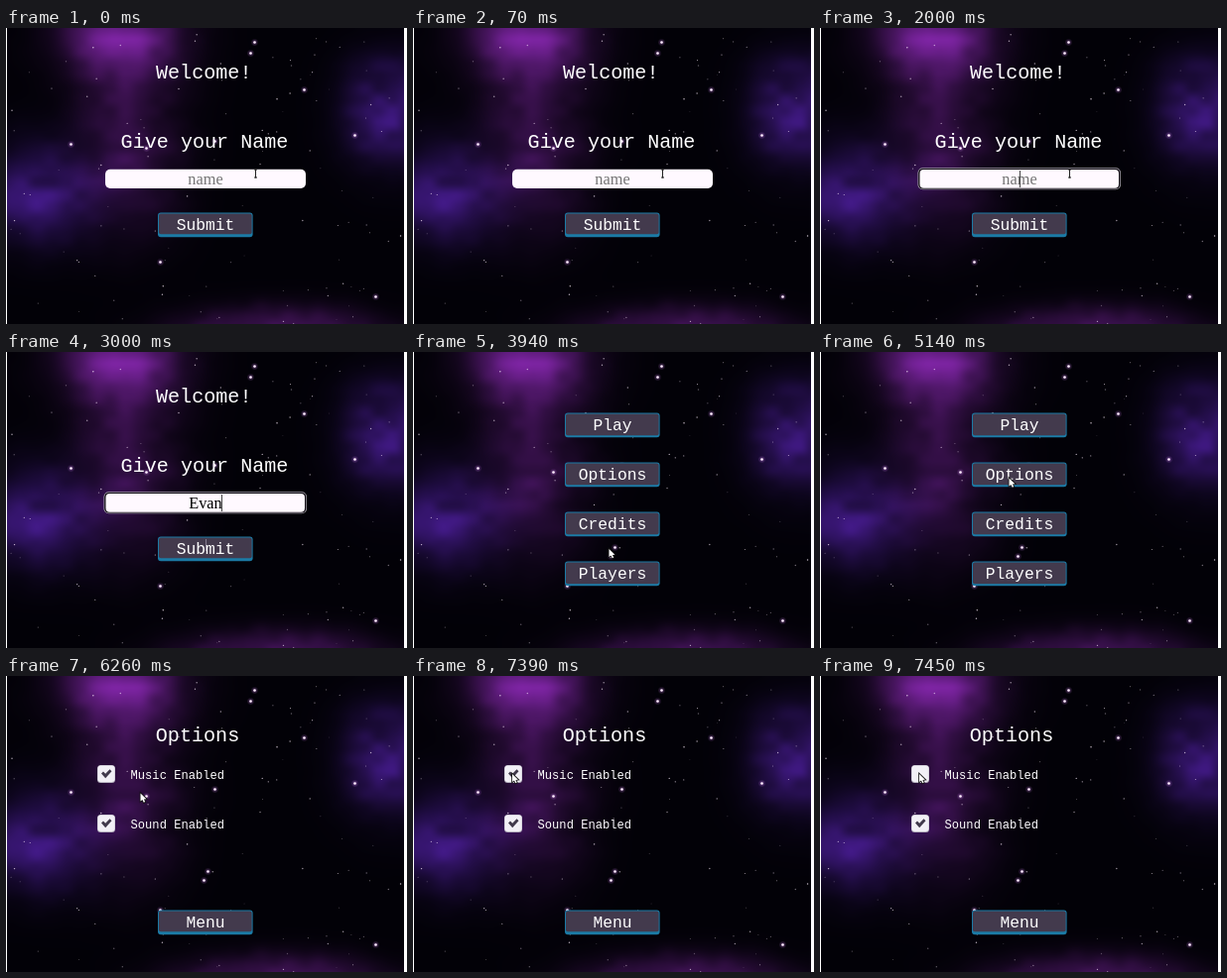
Recreate the animation shown at these times as an HTML page with a canvas. Size 404 px wide and 299 px high, loop 8 s.

```html
<!DOCTYPE html>
<html lang="en">
<head>
<meta charset="utf-8">
<title>Game menu</title>
<style>
html, body { margin: 0; width: 100%; height: 100%; overflow: hidden; background: #fff; }
canvas { display: block; width: 404px; height: 299px; }
</style>
</head>
<body>
<canvas id="stage"></canvas>
<script>
const W = 404, H = 299, LOOP = 8000, MID = 201;
const MONO = '"Liberation Mono", monospace';
const SERIF = '"Liberation Serif", serif';
const VIOLET = [98, 28, 124], INDIGO = [62, 24, 124];
const dpr = window.devicePixelRatio || 1;

function prepare(canvas) {
  canvas.width = Math.round(W * dpr);
  canvas.height = Math.round(H * dpr);
  const c = canvas.getContext('2d');
  c.scale(dpr, dpr);
  return c;
}

const ctx = prepare(document.getElementById('stage'));
const sky = document.createElement('canvas');

function seeded(seed) {
  return () => (seed = (seed * 16807) % 2147483647) / 2147483647;
}

function hash(x, y) {
  const s = Math.sin(x * 127.1 + y * 311.7) * 43758.5453;
  return s - Math.floor(s);
}

// Smooth value noise, 0 to 1.
function noise(x, y) {
  const ix = Math.floor(x), iy = Math.floor(y);
  const ease = v => v * v * (3 - 2 * v);
  const mix = (a, b, k) => a + (b - a) * k;
  const u = ease(x - ix), v = ease(y - iy);
  return mix(mix(hash(ix, iy), hash(ix + 1, iy), u),
    mix(hash(ix, iy + 1), hash(ix + 1, iy + 1), u), v);
}

// Gaussian clouds, broken up by noise.
function paintNebula(c) {
  const clouds = [
    { x: 115, y: 8, rx: 50, ry: 38, power: 0.95, rgb: VIOLET },
    { x: 125, y: 120, rx: 42, ry: 65, power: 0.55, rgb: VIOLET },
    { x: 30, y: 165, rx: 55, ry: 42, power: 0.8, rgb: INDIGO },
    { x: 385, y: 85, rx: 36, ry: 45, power: 0.9, rgb: INDIGO },
    { x: 275, y: 306, rx: 72, ry: 20, power: 1, rgb: VIOLET }
  ];
  const layer = document.createElement('canvas');
  layer.width = W;
  layer.height = H;
  const lc = layer.getContext('2d');
  const image = lc.createImageData(W, H);
  for (let y = 0; y < H; y++) {
    for (let x = 0; x < W; x++) {
      const i = (y * W + x) * 4;
      const n = noise(x / 38, y / 30) * 0.65 + noise(x / 15, y / 12) * 0.35;
      const rgb = [2, 1, 7];
      for (const cl of clouds) {
        const dx = (x - cl.x) / cl.rx, dy = (y - cl.y) / cl.ry;
        const k = cl.power * Math.exp(-(dx * dx + dy * dy) * 0.8) * (0.5 + n);
        cl.rgb.forEach((v, j) => { rgb[j] += v * k; });
      }
      image.data.set([...rgb, 255], i);
    }
  }
  lc.putImageData(image, 0, 0);
  c.drawImage(layer, 0, 0, W, H);
}

function star(c, x, y, r, alpha, glow) {
  if (glow) {
    const g = c.createRadialGradient(x, y, 0, x, y, r * 3);
    g.addColorStop(0, 'rgba(190,120,220,0.5)');
    g.addColorStop(1, 'rgba(190,120,220,0)');
    c.fillStyle = g;
    c.fillRect(x - 5, y - 5, 10, 10);
  }
  c.fillStyle = `rgba(255,240,255,${alpha})`;
  c.beginPath();
  c.arc(x, y, r, 0, Math.PI * 2);
  c.fill();
}

function paintSky() {
  const c = prepare(sky), rnd = seeded(4217);
  c.fillStyle = '#fff';
  c.fillRect(0, 0, W, H);
  c.beginPath();
  c.rect(1, 0, 400, H);
  c.clip();
  paintNebula(c);
  for (let i = 0; i < 110; i++) {
    star(c, 1 + rnd() * 400, rnd() * H, 0.4 + rnd() * 0.4, 0.25 + rnd() * 0.55);
  }
  const bright = [
    [250, 14], [246, 25], [300, 62], [351, 108], [65, 117], [141, 121],
    [210, 114], [203, 197], [199, 206], [155, 236], [372, 271]
  ];
  bright.forEach(([x, y]) => star(c, x + 0.5, y + 0.5, 1.3, 1, true));
}

function box(x, y, w, h, r, fill) {
  ctx.fillStyle = fill;
  ctx.beginPath();
  ctx.roundRect(x, y, w, h, r);
  ctx.fill();
}

function text(str, x, y, size, align = 'left', color = '#fff', family = MONO) {
  ctx.font = `${size}px ${family}`;
  ctx.textAlign = align;
  ctx.fillStyle = color;
  ctx.fillText(str, x, y);
}

function title(str, x, y) {
  text(str, x, y, 20.1);
}

function poly(points, fill, stroke, width) {
  ctx.beginPath();
  points.forEach(([x, y]) => ctx.lineTo(x, y));
  ctx.closePath();
  if (stroke) {
    ctx.strokeStyle = stroke;
    ctx.lineWidth = width;
    ctx.stroke();
  }
  ctx.fillStyle = fill;
  ctx.fill();
}

function button(label, y, edge = 2) {
  box(153, y - 0.4, 95.6, 24.6, 3, '#1b7aa5');
  box(154, y + 0.6, 93.6, 23.6 - edge, 2, '#433a4d');
  text(label, MID, y + 17, 16.3, 'center');
}

function vline(x, y, h, color) {
  ctx.fillStyle = color;
  ctx.fillRect(x, y, 1, h);
}

function ibeam(x, y) {
  vline(x, y, 9, '#222');
  ctx.fillRect(x - 1, y, 3, 1);
  ctx.fillRect(x - 1, y + 8, 3, 1);
}

function arrow(x, y) {
  ctx.save();
  ctx.translate(x, y);
  poly([[0.5, 0.5], [0.5, 8.5], [2.4, 6.9], [3.8, 9.8], [5.2, 9.1], [3.9, 6.4], [6.4, 6.2]],
    '#fff', '#111', 1.6);
  ctx.restore();
}

function checkbox(label, y, checked) {
  box(92, y, 18, 18, 3.5, '#b9b5c2');
  box(92.5, y + 0.5, 17, 16.5, 3, '#f2f0f6');
  if (checked) {
    poly([[96, y + 8.5], [98, y + 6.5], [100.2, y + 8.7], [104.5, y + 4.2],
      [106.5, y + 6.2], [100.2, y + 13.2]], '#40394b');
  }
  text(label, 125.6, y + 14, 12.1);
}

function nameScreen(focused, typed) {
  title('Welcome!', 151, 51);
  title('Give your Name', 115.6, 121);
  if (focused) {
    box(98.5, 141.3, 204.5, 22, 5, '#a5a1aa');
    box(99.2, 142, 203.1, 20.6, 4.5, '#100d14');
    box(100.5, 143, 200.5, 18.7, 4, '#fff9ff');
  } else {
    box(100, 142.7, 202, 19.3, 5, '#fff9ff');
  }
  if (typed) text('Evan', MID, 158, 16.3, 'center', '#000', SERIF);
  else text('name', MID, 158, 16.3, 'center', '#757575', SERIF);
  if (focused) vline(typed ? 217 : 201, 144, 17, '#444');
  button('Submit', 187, 3);
  if (typed) vline(201, 189, 12, 'rgba(190,180,200,0.55)');
  else ibeam(251, 142.5);
}

function menuScreen(x, y) {
  ['Play', 'Options', 'Credits', 'Players'].forEach((s, i) => button(s, 62 + i * 50));
  arrow(x, y);
}

function optionsScreen(x, y, music) {
  title('Options', 150.8, 66);
  checkbox('Music Enabled', 90, music);
  checkbox('Sound Enabled', 140, true);
  button('Menu', 237, 3);
  arrow(x, y);
}

const scenes = [
  [0, () => nameScreen(false, false)],
  [2000, () => nameScreen(true, false)],
  [3000, () => nameScreen(true, true)],
  [3940, () => menuScreen(197, 198.5)],
  [4810, () => menuScreen(194, 158)],
  [5140, () => menuScreen(190, 127)],
  [6260, () => optionsScreen(135, 118, true)],
  [7390, () => optionsScreen(99.5, 98.5, true)],
  [7450, () => optionsScreen(99.5, 98.5, false)]
];

function draw(now) {
  const t = now % LOOP;
  ctx.drawImage(sky, 0, 0, W, H);
  scenes.filter(([start]) => start <= t).pop()[1]();
}

const begin = performance.now();
function tick() {
  draw(performance.now() - begin);
  requestAnimationFrame(tick);
}

paintSky();
tick();
</script>
</body>
</html>
```
